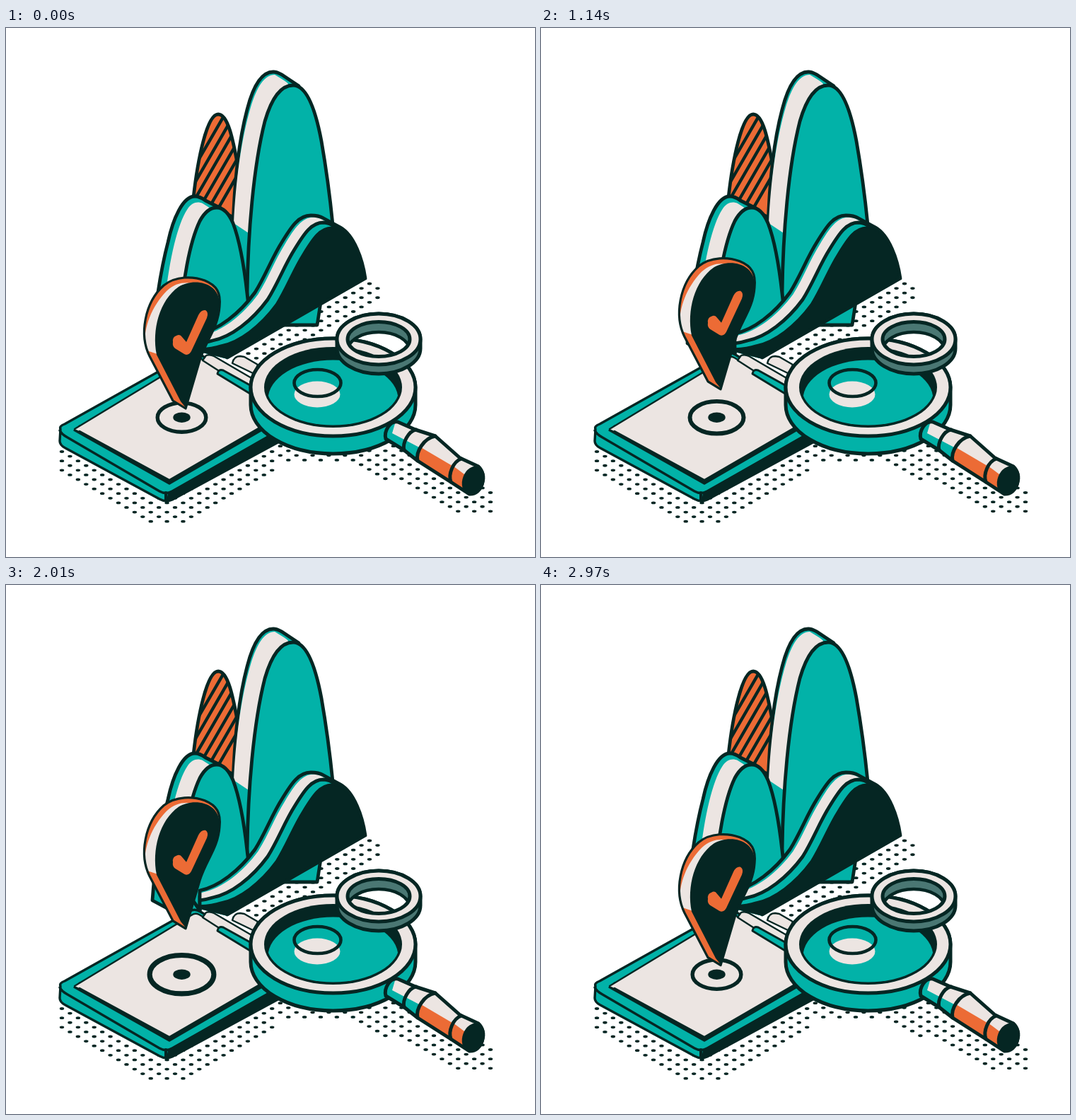
An HTML page with a canvas for the animation above (3000 ms loop, 748 by 748 pixels).

```html
<!DOCTYPE html>
<html lang="en">
<head>
<meta charset="utf-8">
<title>Map pin, chart and magnifier</title>
<style>
html, body { margin: 0; width: 100%; height: 100%; overflow: hidden; background: #fff; }
canvas { display: block; width: 748px; height: 748px; }
</style>
</head>
<body>
<canvas id="stage" width="748" height="748"></canvas>
<script>
const SIZE = 748, LOOP = 3000, HOP = 1500, STEP = 30;
const INK = '#052623', TEAL = '#02b2a8', BEIGE = '#ece5e2', ORANGE = '#ec6b35', GREY = '#4a7773';

const view = document.getElementById('stage').getContext('2d');
const backdrop = document.createElement('canvas');
backdrop.width = backdrop.height = SIZE;
let c = backdrop.getContext('2d');

function paint(path, fill, width, rule = 'nonzero') {
  if (fill) { c.fillStyle = fill; c.fill(path, rule); }
  if (width) {
    c.strokeStyle = INK;
    c.lineWidth = width;
    c.lineJoin = c.lineCap = 'round';
    c.stroke(path);
  }
}
const shape = (d, fill, width) => paint(new Path2D(d), fill, width);

function shifted(x, y, d, fill, width) {
  c.save();
  c.translate(x, y);
  shape(d, fill, width);
  c.restore();
}

function oval(x, y, rx, ry) {
  const path = new Path2D();
  path.ellipse(x, y, rx, ry, 0, 0, Math.PI * 2);
  return path;
}

// Two concentric ovals, filled with evenodd to leave a hole
function band(x, y, rx, ry, innerX, innerY) {
  const path = oval(x, y, rx, ry);
  path.addPath(oval(x, y, innerX, innerY));
  return path;
}

function drum(x, y, rx, ry, depth) {
  return `M${x - rx} ${y}V${y + depth}A${rx} ${ry} 0 0 0 ${x + rx} ${y + depth}V${y}A${rx} ${ry} 0 0 0 ${x - rx} ${y}Z`;
}

function clipped(d, draw) {
  c.save();
  c.clip(typeof d === 'string' ? new Path2D(d) : d);
  draw();
  c.restore();
}

// Staggered dots inside an area, on a lattice through (x0, y0)
function dots(d, x0, y0) {
  const area = new Path2D(d);
  c.fillStyle = INK;
  for (let row = -60; row <= 60; row++) {
    for (let col = -60; col <= 60; col++) {
      if ((row + col) % 2) continue;
      const x = x0 + col * 11.43, y = y0 + row * 6.58;
      if (c.isPointInPath(area, x, y)) c.fill(oval(x, y, 3.2, 1.9));
    }
  }
}

function drawDots() {
  dots('M320 470L514 356L530 364V385L380 472Z', 514, 361.5);
  dots('M72 594H82L225 668L350 590H384V628L256 702H202L74 630Z', 79, 599);
  dots('M384 575H540L690 653V687H634L560 640L520 636L480 613H384Z', 685, 657);
}

function drawSpike() {
  const spike = 'M265 240C271 186 284 122 300 122C314 122 321 158 328 196L322 268Z';
  shape(spike, ORANGE);
  clipped(spike, () => {
    for (let i = 0; i < 6; i++) {
      const x = 257 + i * 13.5;
      shape(`M${x - 40} 282L${x + 60} 109`, null, 4.4);
    }
  });
  shape(spike, null, 4.8);
}

function drawTallHump() {
  shape('M321 282C323 215 329 160 341 115C350 80 362 62 378 62C383 62 386 64 390 66L414 82L390 380H330Z', TEAL, 4.8);
  shape('M322 276C325 215 333 155 346 112C355 82 366 66 380 66L393 74C399 78 401 80 398 84L350 220L343 290Z', BEIGE);
  shape('M341 376C342 290 350 195 366 132C377 94 391 81 406 81C424 81 437 112 446 160C453 200 458 238 462 278L440 420H341Z', TEAL, 4.8);
}

function drawLeftHump() {
  shape('M207 446C210 400 218 345 229 303C236 270 250 238 267 238C274 238 278 241 282 244L304 255L310 400L274 460L248 468Z', TEAL, 4.8);
  shape('M225 385C231 325 243 277 256 257C263 246 271 245 278 248L289 255L262 315L249 390Z', BEIGE);
  shape('M246 420C249 360 260 302 274 273C281 260 289 254 298 254C307 254 315 262 321 276C331 302 337 340 341 376L345 410L274 440V460Z', TEAL, 4.8);
}

function drawWave() {
  const back = 'C300 427 330 404 352 374C367 350 376 325 390 303C404 280 414 265 431 265';
  const profile = `M235 437C250 437 262 436 274 432${back}C459 267 473 307 480 338V500H235Z`;
  const body = `M274 432${back}C439 265 444 266 449 269L473 282C492 293 504 326 510 355L313 468L274 458Z`;
  shape(body, TEAL);
  clipped(body, () => {
    shifted(4.5, 2.6, profile, BEIGE);
    shifted(18, 10, profile, TEAL, 4.8);
    shifted(30, 17, profile, INK, 3);
  });
  shape(`M274 458V432${back}C439 265 444 266 449 269L473 282C492 293 504 326 508 354L313 466`, null, 4.8);
}

function drawClipboard() {
  shape('M77 567Q75 563 83 560L260 461Q267 457 275 462L390 533V583L235 667Q226 671 217 666L84 594Q76 590 76 584Z', TEAL, 3.4);
  shape('M229 657L379 571L390 583L235 668L227 669Z', INK);
  shape('M76 569Q78 574 87 579L217 655Q226 660 235 655L380 573', null, 3.4);
  shape('M226 657V668', null, 4);
  shape('M96 569L231 645L400 547V536L231 636L104 562Z', INK, 1.5);
  shape('M97 567L262 467Q267 463 273 466L400 541L231 639L104 570Z', BEIGE);
  shape('M97 567L262 467Q267 463 273 466L400 541L231 639L104 570', null, 2.4);
  // Clip
  shape('M320 474Q322 464 331 464L337 465L356 476L351 489Z', BEIGE, 2.4);
  shape('M278 470L283 463Q288 461 294 464L354 499L350 512L306 488Z', BEIGE, 2.4);
  shape('M299 489Q300 482 307 484L354 510L350 520Z', TEAL, 3);
}

function drawLens() {
  const x = 462.5, y = 508;
  shape(drum(x, y, 116.5, 69, 25), TEAL, 5);
  paint(oval(x, y, 116.5, 69), BEIGE, 5);
  paint(oval(x, y, 97.5, 57), INK);
  clipped(oval(x, y, 94, 53.5), () => paint(oval(x, 525, 92, 55.5), TEAL));
  paint(oval(440, 518, 32.5, 18.5), BEIGE);
  clipped(oval(440.5, 502, 33, 19), () => {
    paint(oval(440.5, 502, 33, 19), TEAL);
    paint(oval(440, 518, 32.5, 18.5), BEIGE);
  });
  paint(oval(440.5, 502, 33, 19), null, 4.6);
}

function drawHandle() {
  const body = 'M537 581C534 570 543 555 554 557L579 568L607 577L642 608L668 620C681 632 674 660 655 659L629 642L582 612L563 597Z';
  shape(body, BEIGE);
  clipped(body, () => {
    shape('M530 552L551 556L546 573L590 596L590 620L530 600Z', TEAL);
    shape('M585 592L636 622L660 640V670L580 615Z', ORANGE);
  });
  shape(body, null, 5);
  shape('M563 597C560 587 569 570 580 568M582 612C579 599 591 580 607 577M629 642C625 631 632 613 644 609', null, 5);
  c.save();
  c.translate(661, 640);
  c.rotate(0.36);
  paint(oval(0, 0, 14.5, 20), INK, 2);
  c.restore();
}

function drawHoop() {
  const x = 527, y = 440;
  const side = new Path2D(drum(x, y, 59, 36, 13));
  side.addPath(oval(x, y, 57, 34));
  paint(side, GREY, 0, 'evenodd');
  shape(drum(x, y, 59, 36, 13), null, 5);
  clipped(oval(x, y, 44, 24.5), () => {
    const wall = new Path2D('M470 400H590V480H470Z');
    wall.addPath(oval(x, y + 15, 43, 25));
    paint(wall, GREY, 0, 'evenodd');
    paint(oval(x, y + 15, 43, 25), null, 4.5);
  });
  paint(band(x, y, 59, 36, 44, 24.5), BEIGE, 5, 'evenodd');
}

function drawTarget(scale) {
  c.save();
  c.translate(248.5, 550.7);
  paint(oval(0, 0, 12.2, 7.2), INK);
  c.scale(scale, scale);
  paint(oval(0, 0, 34.3, 20.6), null, 5.4);
  c.restore();
}

function drawPin(lift) {
  c.save();
  c.translate(0, -lift);
  const body = 'M254 538L236 527L203 464C188 434 196 388 223 364C240 350 265 351 281 357C298 364 304 374 302 394C300 424 283 441 274 470Z';
  shape(body, ORANGE);
  clipped(body, () => {
    shape('M196 455C194 428 203 397 227 372C239 361 250 359 264 361L220 440L214 461Z', BEIGE);
  });
  shape('M255 538L247 528L213 462C206 427 217 385 244 366C264 353 303 358 302 392C301 424 283 441 274 470Z', INK);
  shape(body, null, 3.2);
  shape('M236 444Q235 437 241 435Q246 432 249 437L255 444L272 406Q276 398 282 399Q287 402 284 410L262 457Q258 464 252 461L239 453Q235 450 236 444Z', ORANGE);
  c.restore();
}

function drawScene() {
  c.fillStyle = '#fff';
  c.fillRect(0, 0, SIZE, SIZE);
  [drawDots, drawSpike, drawTallHump, drawLeftHump, drawWave,
    drawClipboard, drawLens, drawHandle, drawHoop].forEach(draw => draw());
}

function frame(now) {
  const t = Math.floor((now % LOOP) / STEP) * STEP;
  const wave = (1 - Math.cos(2 * Math.PI * t / HOP)) / 2;
  const first = t < HOP;
  c.drawImage(backdrop, 0, 0);
  drawTarget(1 + wave * (first ? 0.23 : 0.42));
  drawPin(wave * (first ? 58 : 68));
  requestAnimationFrame(tick);
}

let start;
function tick(now) {
  start ??= now;
  frame(Math.max(0, now - start));
}

drawScene();
c = view;
frame(0);
</script>
</body>
</html>
```
